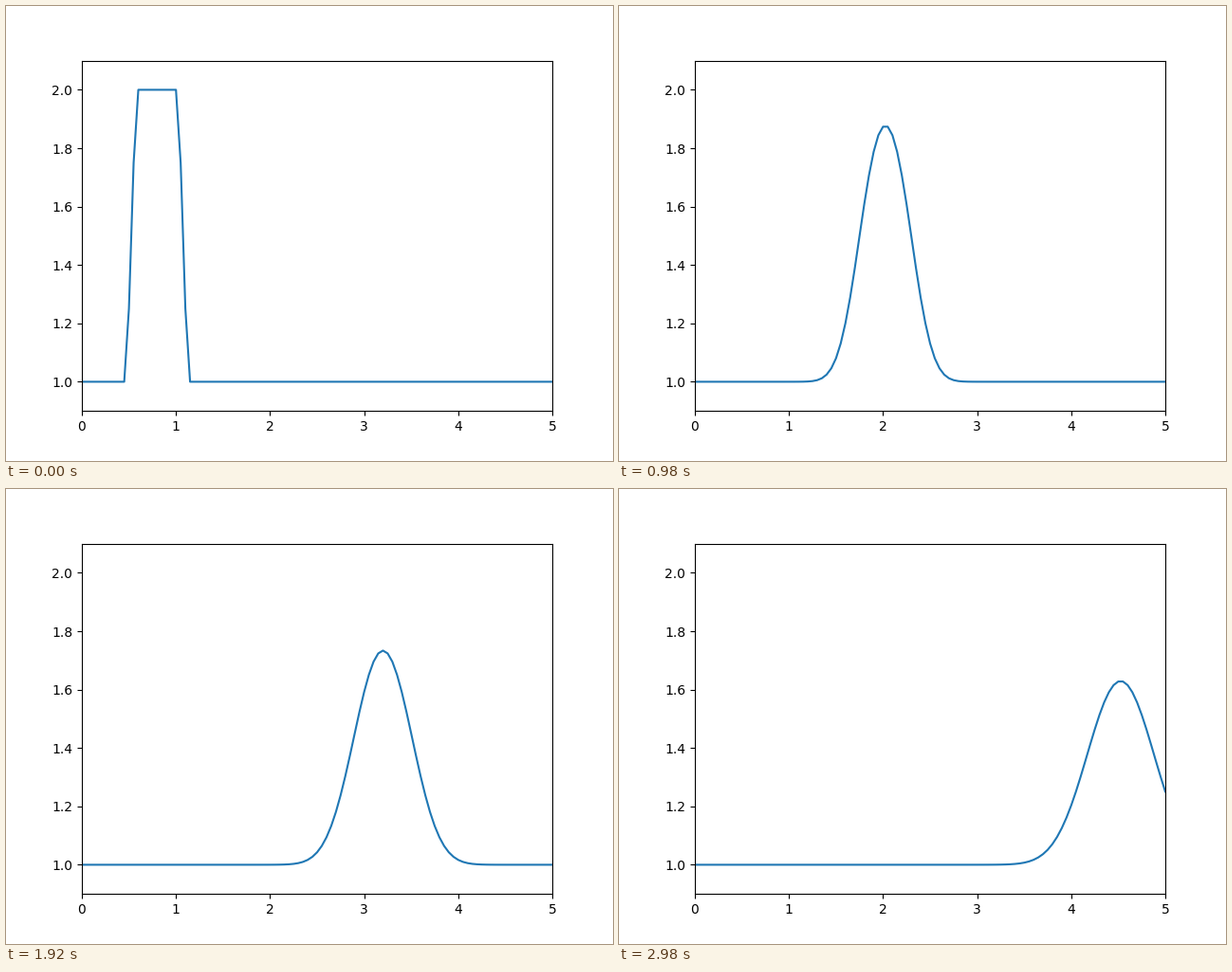
Write a matplotlib script that moves like this. It is 640 by 480 pixels and loops after 3 s.

```python
import numpy as np
import matplotlib.pyplot as plt
from matplotlib.animation import FuncAnimation

FRAMES = 150
INTERVAL = 20   # ms
CFL = 0.5       # c * dt / dx
LEAD = 2        # time steps already taken at the first frame

x = np.linspace(0, 5, 101)


def solve(steps):
    """Linear convection of a square pulse, first-order upwind."""
    u = np.ones_like(x)
    u[10:21] = 2
    history = [u]
    for _ in range(steps):
        nxt = u.copy()
        nxt[1:] -= CFL * (u[1:] - u[:-1])
        history.append(nxt)
        u = nxt
    return history


waves = solve(FRAMES + LEAD)

fig, ax = plt.subplots(figsize=(6.4, 4.8), dpi=100)
ax.set_xlim(0, 5)
ax.set_ylim(0.9, 2.1)
line, = ax.plot(x, waves[LEAD])


def update(i):
    line.set_ydata(waves[i + LEAD])
    return line,


anim = FuncAnimation(fig, update, frames=FRAMES, interval=INTERVAL,
                     repeat=True, repeat_delay=0)
plt.show()
```
